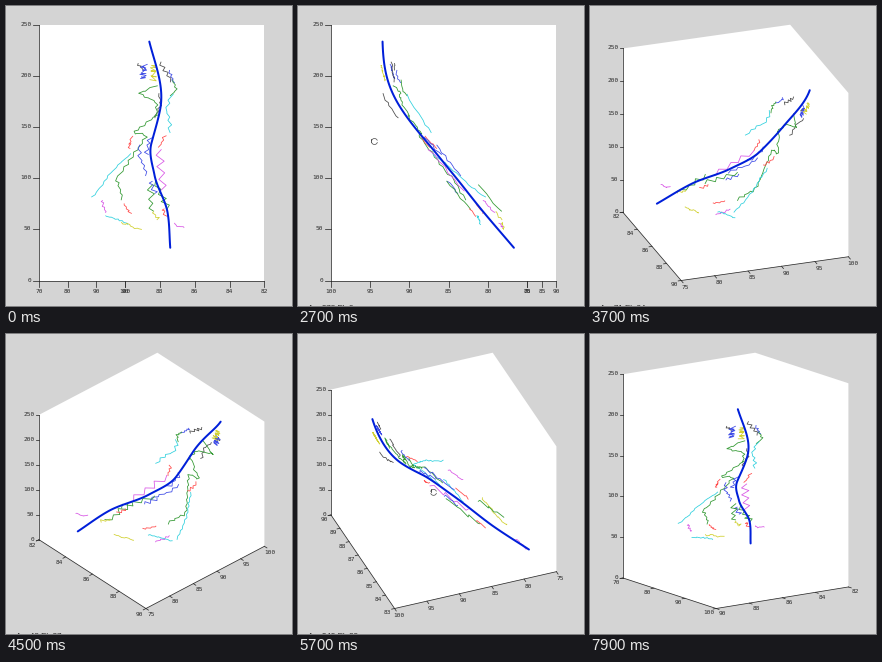
Write a matplotlib script that moves like this. It is 286 by 300 pixels and loops after 8000 ms.

```python
import numpy as np
import matplotlib.pyplot as plt
from matplotlib.animation import FuncAnimation

W, H, DPI = 286, 300, 100
FRAMES, STEP = 80, 100
LEFT, TOP, WIDE, TALL = 32.4, 18.2, 225.5, 255.8
BACK, INK = "#d4d4d4", "#2a2a2a"
PX = 72 / DPI

COLORS = dict(b=(.25, .3, .9), g=(.2, .6, .2), r=(1, .3, .3),
              c=(.2, .82, .87), m=(.85, .35, .9), y=(.82, .82, .2),
              k=(.3, .3, .3))


def smooth(t, points):
    """Monotone cubic through (t, v) points, clamped at both ends."""
    ts, vs = np.array(points, float).T
    t = np.clip(t, ts[0], ts[-1])
    h, d = np.diff(ts), np.diff(vs) / np.diff(ts)
    prod = d[:-1] * d[1:]
    total = np.where(prod > 0, d[:-1] + d[1:], 1)
    m = np.concatenate([d[:1], np.where(prod > 0, 2 * prod / total, 0), d[-1:]])
    i = np.clip(np.searchsorted(ts, t, side="right") - 1, 0, len(d) - 1)
    s = (t - ts[i]) / h[i]
    return (vs[i] * (1 + 2 * s) * (1 - s) ** 2 + vs[i + 1] * s * s * (3 - 2 * s)
            + h[i] * s * (1 - s) * (m[i] * (1 - s) - m[i + 1] * s))


# ---- data: X and Y are distances below x = 90 and y = 100 ----
def depth(z):
    """Y of the main curve: a straight slope that levels off near the top."""
    return 3.4 + 2.4 * np.logaddexp(0, (186 - z) / 20)


zs = np.linspace(32, 233.5, 90)
bend = [(32, 6.2), (67, 5.35), (103, 3.9), (134, 3.13), (167, 3.08), (233.5, 1.99)]
spine = np.column_stack([smooth(zs, bend), depth(zs), zs])

rng = np.random.default_rng(7)
strands = []


def strand(color, dy, *knots, jag=.08, lean=0):
    """Jagged line through (X, z) knots, dy away from the main curve."""
    x, z = np.array(knots, float).T
    run = np.append(0, np.cumsum(np.hypot(18 * np.diff(x), np.diff(z))))
    n = int(4 + run[-1] / (2 + 25 * jag))
    s = np.linspace(0, run[-1], n)
    x, z = np.interp(s, run, x), np.interp(s, run, z)
    y = depth(z) + dy + lean * s / run[-1] + rng.normal(0, .08, n)
    x += jag * (-1) ** np.arange(n) * rng.uniform(.3, 1, n)
    strands.append((COLORS[color], np.column_stack([x, y, z + rng.normal(0, .7, n)])))


def scribble(color, dy, x, z, n=14):
    """Dense zigzag around one spot."""
    dx = .22 * (-1) ** np.arange(n) * rng.uniform(.3, 1, n)
    dz = np.linspace(7, -7, n) + rng.normal(0, 1.5, n)
    strands.append((COLORS[color], np.column_stack(
        [x + dx, depth(z + dz) + dy, z + dz])))


# top
strand("k", 1, (1.55, 212), (1.9, 206))
scribble("b", .6, 1.87, 204)
scribble("y", -.5, 2.25, 204)
strand("k", 1.1, (2.8, 213), (3.6, 195), jag=.14)
strand("b", 1.8, (3.5, 205), (3.85, 194))
strand("g", 2, (3.8, 195), (4.1, 188), (3.9, 181))
strand("c", 2.1, (3.9, 181), (3.75, 167), (4.15, 157), (4.25, 145), jag=.13)
strand("k", -1.4, (2.55, 182), (2.85, 172), (2.6, 158), jag=.12)
# left side
strand("g", .5, (2.65, 190), (1.8, 183), (2.85, 174), (3, 162))
strand("g", .4, (3, 162), (1.85, 144), (2.65, 142), (2.37, 131), (1.54, 100),
       (2.2, 79), lean=-2.4)
strand("c", -.9, (1.95, 124), (1.2, 103), (.81, 81), jag=.05, lean=1)
strand("r", 0, (1.85, 140), (1.95, 128))
strand("m", 0, (1.3, 79), (1.85, 66))
strand("c", -2.6, (1.4, 64), (2.9, 56), jag=.05)
strand("y", .2, (2.94, 57), (4.17, 50), jag=.05)
strand("r", -1, (2.5, 75), (3.1, 66))
# middle and right side
strand("b", .7, (2.55, 132), (2.95, 118), (3.6, 103), jag=.15)
strand("b", .3, (3, 141), (3.1, 122), jag=.15)
strand("r", 0, (3.78, 141), (3.64, 131), jag=.1)
strand("m", -.3, (3.6, 128), (4, 110), (4.6, 87), jag=.3)
strand("b", -1.6, (3.5, 97), (4.1, 85), jag=.15)
strand("g", -1.6, (3.7, 97), (5.2, 68), jag=.25)
strand("g", 2.1, (4.17, 93), (4.8, 67), jag=.25)
strand("r", -1.6, (4.75, 70), (5.05, 63), jag=.12)
strand("y", 1.3, (4.67, 67), (5.24, 60), jag=.12)
strand("m", 1.1, (6.1, 57), (6.3, 53), (6.8, 53), jag=.05)

# ---- motion: (ms, degrees) ----
AZ = [(1100, 148.3), (1300, 150), (1500, 150), (1900, 159.2), (2700, 278.4),
      (3700, 430.8), (3900, 448), (4000, 448), (5100, 322.3), (6300, 184.1),
      (6900, 144.8)]
EL = [(1100, 0), (1900, 4), (2700, 0), (3700, 23.8), (3900, 29), (4000, 29),
      (5100, 46.7), (6300, 24.6), (6900, 10.4)]


def cursor(t, az, el):
    """The pointer glides freely at both ends and drags the view in between."""
    if t < 1200:
        k = smooth(t, [(200, 0), (1000, 1)])
        return 157 + 97 * k, 90 + 43 * k
    x, y = (412, 135) if t < 4000 else (435, 128)
    k = smooth(t, [(7500, 0), (7900, 1)])
    return x - 1.207 * az - 98 * k, y + .77 * el - 35 * k


X_LIMITS = [(83, 90, 1), (82, 90, 2), (80, 90, 5)]
Y_LIMITS = [(75, 100, 5), (70, 100, 10), (60, 100, 20)]


class View:
    """Orthographic camera stretched to fill the axes rectangle."""

    def __init__(self, az, el):
        az, el = np.radians(az), np.radians(el)
        self.c, self.s = np.cos(az), np.sin(az)
        self.ce, self.se = np.cos(el), np.sin(el)
        span = abs(self.c) + abs(self.s)
        self.kx = WIDE / span
        self.ky = TALL / (self.se * span + self.ce)
        self.xlim = self.pick(X_LIMITS, self.c, self.s)
        self.ylim = self.pick(Y_LIMITS, self.s, self.c)

    def pick(self, choices, across, along):
        """Finest tick step whose labels still have room."""
        dx, dy = abs(across) * self.kx, abs(along) * self.se * self.ky
        for lo, hi, step in choices:
            n = (hi - lo) / step
            if np.hypot(dx / n / 23, dy / n / 13.5) >= 1:
                break
        return lo, hi, step

    def cube(self, u, v, w):
        u, v, w = u - .5, v - .5, w - .5
        up = self.ce * w - self.se * (self.s * u - self.c * v)
        return np.array([LEFT + WIDE / 2 + self.kx * (self.c * u + self.s * v),
                         TOP + TALL / 2 - self.ky * up])

    def data(self, p):
        (x0, x1, _), (y0, y1, _) = self.xlim, self.ylim
        return self.cube((90 - p[:, 0] - x0) / (x1 - x0),
                         (100 - p[:, 1] - y0) / (y1 - y0), p[:, 2] / 250)


fig = plt.figure(figsize=(W / DPI, H / DPI), dpi=DPI, facecolor=BACK)
ax = fig.add_axes([0, 0, 1, 1])


def line(p, q):
    ax.plot([p[0], q[0]], [p[1], q[1]], color=INK, lw=.75 * PX)


def label(x, y, s, ha="center"):
    ax.text(x, y, s, color=INK, size=6.2 * PX, family="DejaVu Sans Mono",
            ha=ha, va="center_baseline")


def floor_axis(view, axis, near, flat):
    """Ticks and labels on the front floor edge that runs along x or y."""
    lo, hi, step = (view.xlim, view.ylim)[axis]
    other = 1 - axis
    for val in range(lo, hi + 1, step):
        uv = list(near)
        uv[axis] = (val - lo) / (hi - lo)
        p = view.cube(*uv, 0)
        if flat:
            tip, at = p + (0, 6 if view.se < .01 else 3), p + (0, 10.5)
        else:
            inner = list(uv)
            inner[other] = 1 - near[other]
            d = p - view.cube(*inner, 0)
            d /= max(np.hypot(*d), 1e-6)
            tip, at = p + 3 * d, p + (7 * d[0], 3 + 4.5 * d[1])
        line(p, tip)
        label(*at, str(val))


def draw_axes(view, el):
    near = (float(view.s > 0), float(view.c < 0))
    a, b = (1 - near[0], near[1]), (near[0], 1 - near[1])
    left, right = sorted((a, b), key=lambda q: view.cube(*q, 0)[0])
    far = (1 - near[0], 1 - near[1])
    hull = [view.cube(*q, w) for q, w in
            ((left, 0), (near, 0), (right, 0), (right, 1), (far, 1), (left, 1))]
    ax.fill(*np.array(hull).T, color="white", lw=0)
    line(hull[0], hull[1])
    line(hull[1], hull[2])
    line(hull[0], hull[5])

    for axis in (0, 1):
        floor_axis(view, axis, near, el < 6)
    size = 6 if el < .5 else 3
    for val in range(0, 251, 50):
        p = view.cube(*left, val / 250)
        line(p, p - (size, 0))
        label(p[0] - size - 1.5, p[1] - 1, str(val), "right")


def draw_cursor(x, y):
    for start in (20, 200):
        a = np.radians(np.linspace(start, start + 135, 12))
        ax.plot(x + 3 * np.cos(a), y + 3 * np.sin(a), color="#555555", lw=.75 * PX)
    line((x - 3, y - 3), (x - 3, y))


def update(i):
    t = i * STEP
    az, el = smooth(t, AZ), smooth(t, EL)
    ax.cla()
    ax.set(xlim=(-.5, W - .5), ylim=(H - .5, -.5))
    ax.axis("off")
    view = View(az, el)
    draw_axes(view, el)
    for color, p in strands:
        ax.plot(*view.data(p), color=color, lw=.8 * PX)
    ax.plot(*view.data(spine), color=(0, .12, .85), lw=2 * PX,
            solid_capstyle="round")
    if 100 <= t < 7900:
        draw_cursor(*cursor(t, az, el))
    if 1200 <= t <= 6900:
        ax.text(9, 298, f"Az: {az % 360:.0f} El: {el:.0f}", color=INK,
                size=8 * PX, family="Liberation Sans", va="top")
    return []


anim = FuncAnimation(fig, update, frames=FRAMES, interval=STEP,
                     init_func=lambda: update(0), repeat=True, repeat_delay=0)
plt.show()
```
